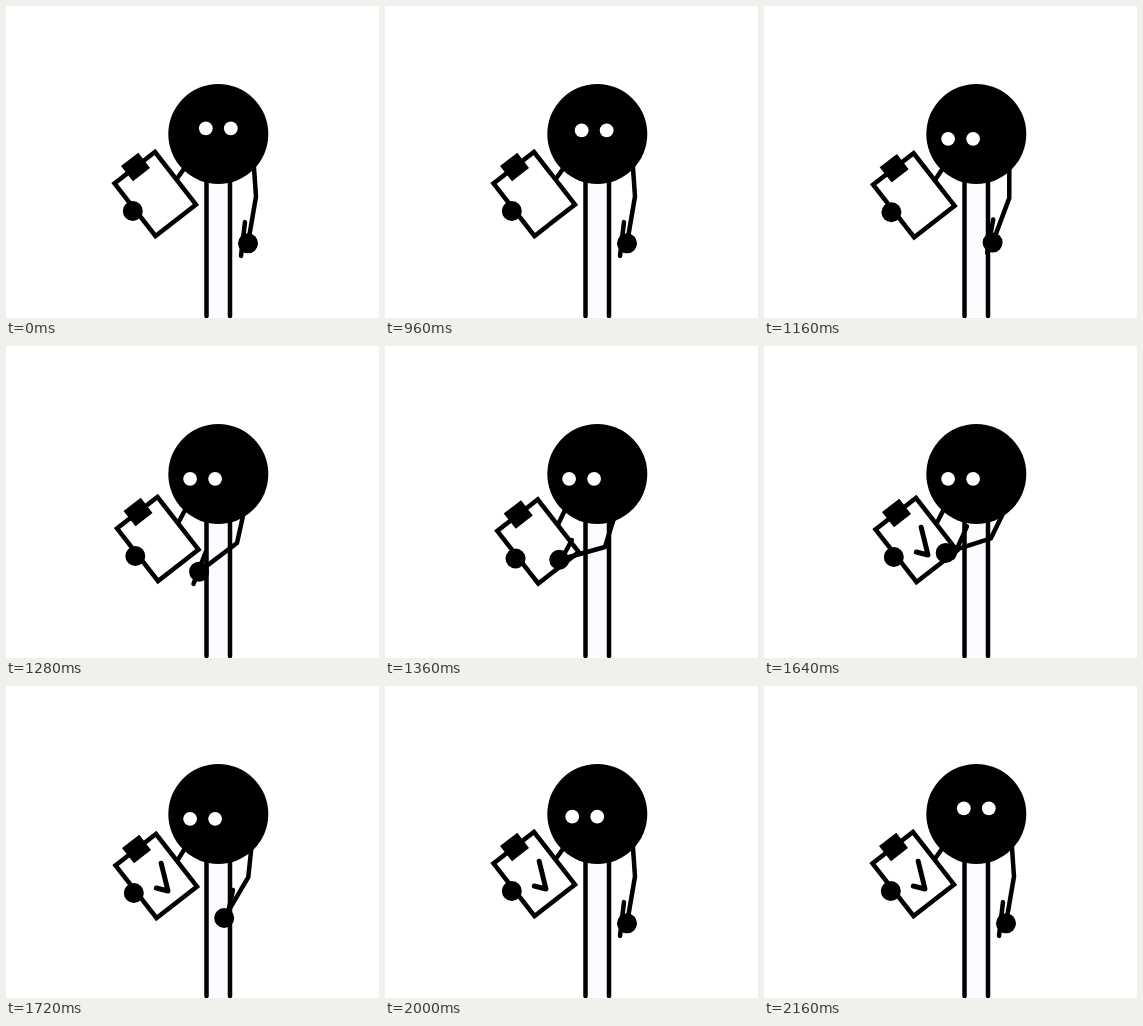
These frames come from a looping animation (373 by 312 pixels, 2.88 s). An HTML page:

```html
<!DOCTYPE html>
<html lang="en">
<head>
<meta charset="utf-8">
<title>Checklist</title>
<style>
  html, body { margin: 0; width: 100%; height: 100%; overflow: hidden; background: #fff; }
  svg { display: block; width: 100vw; height: 100vh; }
  .line { fill: none; stroke: #000; stroke-width: 4.5; stroke-linecap: round; stroke-linejoin: round; }
</style>
</head>
<body>
<svg viewBox="0 0 373 312">
  <path id="leftArm" class="line"/>
  <rect x="200.5" y="170" width="23.5" height="140" fill="#fafbff"/>
  <path class="line" d="M200.5 165V310M224 165V310"/>
  <g id="board">
    <path d="M149 146L190 198.500L149.500 230L108.500 177.500Z" fill="#fff" stroke="#000" stroke-width="4.500"/>
    <path d="M132.300 146.800L144 162L127 175.300L115 160Z"/>
    <path id="tick" class="line" style="stroke-width:5"/>
    <circle cx="126.800" cy="205" r="10"/>
  </g>
  <path id="pen" class="line"/>
  <path id="arm" class="line"/>
  <circle id="hand" r="10"/>
  <circle cx="212.300" cy="128" r="50"/>
  <g id="eyes" fill="#fff">
    <circle cx="199.800" cy="122.300" r="6.900"/>
    <circle cx="224.800" cy="122.300" r="6.900"/>
  </g>
</svg>
<script>
const STEP = 40, STEPS = 72;
const UPPER = 48, FORE = 47.5, HALF_PEN = 17;
const TICK = [[149.3, 200], [161, 203], [154.2, 175.3]];

// step, elbow x, elbow y, upper arm angle, forearm angle, pen x, pen y, pen angle, board drop, tick strokes
const POSES = [
  [28, 250, 190.5, 86, 99.7, 237, 233, 96.7, 0, 0],
  [32, 231, 197, 102.5, 142.9, 193.6, 222, 111, 5, 0],
  [36, 209, 205, 112, 186, 164, 196, 125.5, 10, 0],
  [37, 221, 207, 107, 183.5, 175.3, 199.7, 125.5, 10, 1],
  [39, 211.5, 193.5, 136, 203.7, 168.7, 171.2, 125.5, 10, 2],
  [44, 250, 190.5, 86, 99.7, 237, 233, 96.7, 0, 2]
];
const EYES = [[23, 0], [28, 1], [49, 1], [54, 0]];

const el = id => document.getElementById(id);
const mix = (a, b, k) => a + (b - a) * k;
const polar = ([x, y], deg, r) => {
  const a = deg * Math.PI / 180;
  return [x + r * Math.cos(a), y + r * Math.sin(a)];
};
const draw = (id, points) => el(id).setAttribute('d', 'M' + points.map(p => p.join(' ')).join('L'));
const move = (id, x, y) => el(id).setAttribute('transform', `translate(${x} ${y})`);

function sample(keys, step) {
  const next = keys.findIndex(key => key[0] > step);
  if (next === 0) return keys[0].slice(1);
  if (next < 0) return keys[keys.length - 1].slice(1);
  const a = keys[next - 1], b = keys[next];
  const k = (step - a[0]) / (b[0] - a[0]);
  return a.map((v, i) => mix(v, b[i], k)).slice(1);
}

function tickPoints(ink) {
  const whole = Math.floor(ink), points = TICK.slice(0, whole + 1);
  if (ink > whole) {
    points.push(TICK[whole].map((v, i) => mix(v, TICK[whole + 1][i], ink - whole)));
  }
  return points;
}

function render(ms) {
  const step = Math.floor(ms / STEP) % STEPS;
  const [ex, ey, upper, fore, px, py, penAngle, drop, ink] = sample(POSES, step);
  const [look] = sample(EYES, step);
  const elbow = [ex, ey], hand = polar(elbow, fore, FORE), pen = [px, py];

  move('eyes', -15.7 * look, 10.5 * look);
  move('board', drop / 2, drop);
  move('hand', ...hand);
  draw('leftArm', [[185.5, 152], [168 + 0.4 * drop, 177 + 0.8 * drop]]);
  draw('arm', [polar(elbow, upper, -UPPER), elbow, hand]);
  draw('pen', [polar(pen, penAngle, -HALF_PEN), polar(pen, penAngle, HALF_PEN)]);
  draw('tick', tickPoints(ink));
  el('tick').style.display = ink > 0 ? '' : 'none';
}

const start = performance.now();
function loop() {
  render(performance.now() - start);
  requestAnimationFrame(loop);
}
loop();
</script>
</body>
</html>
```
